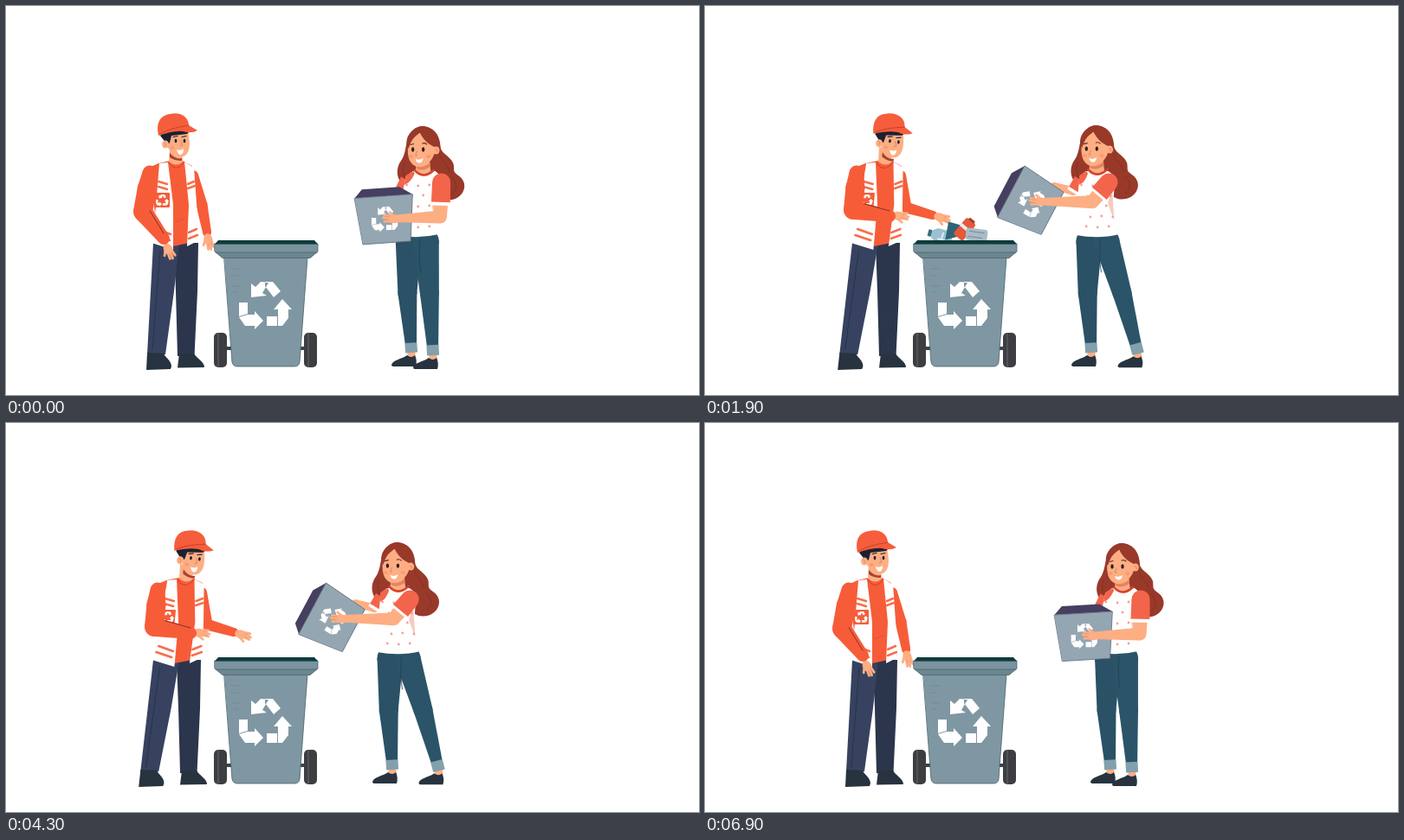
Write an HTML page with a canvas that moves like this. It is 800 px wide and 450 px high and loops after 7 s.

```html
<!DOCTYPE html>
<html lang="en">
<head>
<meta charset="utf-8">
<title>Recycling</title>
<style>
html, body { margin: 0; width: 100%; height: 100%; overflow: hidden; background: #fff; }
canvas { display: block; width: 800px; height: 450px; }
</style>
</head>
<body>
<canvas id="stage" width="800" height="450"></canvas>
<script>
const ctx = document.getElementById('stage').getContext('2d');
const LOOP = 7000, STEP = 100;
const SKIN = '#fdae83', RED = '#f75c39', SLEEVE = '#f3654b', HAIR = '#98392a', JEANS = '#2b5468', SHOE = '#27333f';

// ---- maths ----
const mix = (a, b, u) => a + (b - a) * u;
const mixPt = (a, b, u) => [mix(a[0], b[0], u), mix(a[1], b[1], u)];
const clamp = v => Math.max(0, Math.min(1, v));
const ramp = (t, from, to) => {
  const u = clamp((t - from) / (to - from));
  return u * u * (3 - 2 * u);
};

// ---- drawing helpers ----
function path(color, d) { ctx.fillStyle = color; ctx.fill(new Path2D(d)); }

function line(color, width, d) {
  ctx.strokeStyle = color;
  ctx.lineWidth = width;
  ctx.lineCap = ctx.lineJoin = 'round';
  ctx.stroke(new Path2D(d));
}

function oval(color, x, y, rx, ry = rx) {
  ctx.fillStyle = color;
  ctx.beginPath();
  ctx.ellipse(x, y, rx, ry, 0, 0, 7);
  ctx.fill();
}

function bar(color, x, y, w, h, r) {
  ctx.fillStyle = color;
  ctx.beginPath();
  ctx.roundRect(x, y, w, h, r);
  ctx.fill();
}

function at(x, y, turn, draw, scale = 1) {
  ctx.save();
  ctx.translate(x, y);
  ctx.rotate(turn);
  ctx.scale(scale, scale);
  draw();
  ctx.restore();
}

// Slants a drawing sideways, keeping the level y in place
function slant(k, y, draw) {
  ctx.save();
  ctx.transform(1, 0, k, 1, -k * y, 0);
  draw();
  ctx.restore();
}

// Tapered limb through joints, with a width at each
function limb(color, pts, widths, round = true) {
  pts.forEach((p, i) => {
    if (round) oval(color, p[0], p[1], widths[i] / 2);
    if (!i) return;
    const o = pts[i - 1], a = Math.atan2(p[1] - o[1], p[0] - o[0]);
    const nx = -Math.sin(a) / 2, ny = Math.cos(a) / 2, w = widths[i - 1], v = widths[i];
    path(color, `M${o[0] + nx * w} ${o[1] + ny * w}L${p[0] + nx * v} ${p[1] + ny * v}`
      + `L${p[0] - nx * v} ${p[1] - ny * v}L${o[0] - nx * w} ${o[1] - ny * w}Z`);
  });
}

function hand(x, y, turn) {
  at(x, y, turn, () => {
    oval(SKIN, -2, 0, 7, 5);
    line(SKIN, 2.8, 'M0 -3L8 -4M0 -1L10 0M0 2L9 3M-3 3L3 7');
    line('#e08a61', .6, 'M3 -2L8 -2M3 1.5L8 1.7');
  });
}

function arrows(x, y, turn, scale) {
  at(x, y, turn, () => {
    path('#fff', 'M-16 -26L-16 -10L2 -12L-3 -15L4 -27L-5 -28L-11 -22ZM0 -28L9 -28L18 -17L10 -10L0 -23Z'
      + 'M10 4L20 -8L31 4L27 4L27 14L20 23L15 23L15 4ZM2 12L14 12L14 23L2 23Z'
      + 'M-30 -4L-20 -4L-20 9L-30 12ZM-30 13L-20 10L-12 10L-12 6L-2 17L-12 27L-12 23L-23 23Z');
  }, scale);
}

// ---- bin ----
function bin() {
  line('#3f4145', 4, 'M250 396H350');
  for (const x of [240, 344]) {
    bar('#3c3e42', x, 378, 15, 40, 5);
    bar('#515358', x + 4, 378, 2, 40, 1);
  }
  const body = 'M252 291H348L339 412Q338 417 333 417H267Q262 417 261 412Z';
  path('#7f97a2', body);
  line('#47606b', .8, body);
  line('#728b96', 1, 'M260 304H271M260 312H268M261 324H271M262 331H267');
  path('#6a848f', 'M246 284H354L350 292H251Z');
  const rim = 'M241 275H360V284L351 291.5H250L241 284Z';
  path('#7a939e', rim);
  path('#6c8691', 'M242 285H359L351 291.5H250Z');
  line('#4c6671', .8, rim + 'M242 285H359');
  path('#0d3c3b', 'M245 271H356L360 275.5H241Z');
  arrows(299, 347, 0, 1);
}

// ---- man: q goes from upright to reaching out ----
function man(q) {
  const bulge = q * (1 - q);

  at(3 * q, 0, 0, () => {
    path('#2b364c', 'M194 274H222L221 330L217.5 405H198L196 330Z');
    path(SHOE, 'M200 402L217 402C220 408 229 411 229 418L198 418.5Z');
  });
  slant(-.06 * q, 274, () => {
    path('#36425f', 'M170 274H200L194 330L184 403H163L167 330Z');
    line('#25304a', .8, 'M178 283L169 398');
    path(SHOE, 'M163 401L182 402C184 407 191 410 191 417L190 420L162 421Z');
  });

  // far arm
  const elbow = [226 + 6 * q, 230 + 3 * q];
  const far = [234 + 39 * q + 20 * bulge, 272 - 27 * q + 18 * bulge];
  limb(RED, [[216 + 10 * q, 196], elbow, mixPt(elbow, far, .76)], [12, 13, 10]);
  hand(far[0], far[1], mix(1.3, .3, q));

  // shirt and vest
  slant(-.09 * q, 277, () => {
    ctx.translate(167, 0);
    ctx.scale(1 + .07 * q, 1);
    ctx.translate(-167, 0);
    path(RED, 'M165 187L176 182L189 179H204L215 185L221 272L193 278L172 240Z');
    path('#fff', 'M177 182L187 181L193 230V282L168 274L173 232Z');
    path('#fff', 'M206 180L217 187L223 271L209 278L211 230Z');
    line('#cf4226', 1, 'M188 181Q196 194 206 181');
    line('#d94b2b', .7, 'M196 250L206 246');
    line('#f6704d', 2.5, 'M176 203L186 206M176 209L186 212M210 206L217 203M210 211L218 208'
      + 'M174 258L190 264M172 265L189 271M211 262L220 258M211 269L221 265');
    bar(RED, 172, 216, 17, 17, 1);
    arrows(180.5, 225, 0, .25);
  });

  // near arm
  const shoulder = [166 + 9 * q, 193], bend = [158 + 13 * q, 238 - 2 * q];
  const wrist = [182 + 31 * q, 269 - 26 * q], fold = mixPt(bend, wrist, .25);
  hand(188 + 37 * q, 283 - 40 * q, mix(1.1, .1, q));
  limb(RED, [shoulder, mixPt(shoulder, bend, .4), bend, wrist], [17, 22, 22, 14]);
  line('#5e2a26', .8, `M${fold[0] + 2} ${fold[1] - 9}L${wrist[0]} ${wrist[1] - 6}`);

  // head
  at(12 * q, 0, 0, () => path(SKIN, 'M189 163L203 167L204 180Q197 187 188 180Z'));
  at(195 + 17 * q, 160, .12 * q, () => {
    ctx.translate(-195, -160);
    path('#a5442f', 'M189 170Q196 178 203 176L203 179Q194 179 189 175Z');
    path(SKIN, 'M187 148L210 144C212 155 213 163 210 169C206 177 197 176 192 171L187 164Z');
    path('#1c2130', 'M178 150L184 142L209 140L213 144L209 148L191 150L189 158L186 161L182 155Z');
    oval(SKIN, 184, 160, 4, 4.5);
    line('#d97d57', .8, 'M183 158Q186 160 184 162M202 156L204 161L201 162');
    for (const x of [196, 206]) {
      oval('#1c2130', x, 156, 1.4, 2.2);
      line('#1c2130', 1.2, `M${x - 3} 151.5L${x + 2} 150.5`);
    }
    oval('#f99a76', 192, 164, 2.5, 2);
    path('#fff', 'M197 166Q201 168 205 165Q205 172 201 172Q198 171 197 166Z');
    path('#f65d3c', 'M176 150C173 136 177 127 189 125C202 122 211 129 211 138L221 144Q216 147 208 146C200 143 188 146 176 150Z');
    line('#c23f24', .9, 'M178 148C190 141 202 140 211 138');
  });
}

// ---- box: turns as a rigid body while it moves ----
function boxPose(p) {
  const x = 438.5 - 68 * p, y = 247 - 24 * p ** 1.8, turn = -.06 - 1.14 * p;
  const cos = Math.cos(turn), sin = Math.sin(turn);
  return { x, y, turn, point: (u, v) => [x + u * cos - v * sin, y + u * sin + v * cos] };
}

const junk = [
  () => {
    path('#9cc0d0', 'M-3 -12H3L8 -5V12Q0 15 -8 12V-5Z');
    bar('#3c6c7e', -4, -15, 8, 4, 1);
    line('#dcebf0', 2, 'M-4 -2V8M4 2H-6');
  },
  () => path('#2f6476', 'M-12 9L-2 -10L9 -3L11 10Z'),
  () => {
    bar('#e4593c', -7, -12, 14, 25, 3);
    bar('#e9eef0', -7, -3, 14, 4, 0);
    bar('#a83c2a', -4, -14, 8, 3, 1);
  },
  () => {
    bar('#a9bcc6', -7, -12, 14, 25, 3);
    line('#748d9a', 1, 'M-3 -8V9M3 -6V10');
  }
];

// Rises out of the box, drops into the bin and sinks
function rubbish(t, box) {
  if (t > 2400) return;
  const rise = clamp(t / 1000) ** 2, sink = 34 * clamp((t - 1950) / 450);
  junk.forEach((draw, i) => {
    const fall = clamp((t - 1100 - 55 * i) / 600);
    const [x, y] = box.point(9 * i - 13, mix(0, 4 * i - 40, rise));
    at(mix(x, 272 + 14 * i, fall), mix(y, 266 - 9 * Math.sin(i), fall * fall) + sink,
      mix(box.turn, i - 1.3, fall), draw);
  });
}

// ---- woman: p goes from upright to leaning, step moves her near foot ----
function leg(hip, ankle, bend, turn, color) {
  const knee = [(hip + ankle[0]) / 2 - bend, 332];
  limb(SKIN, [ankle, [ankle[0] + turn * -3, ankle[1] + 7]], [9, 9]);
  at(ankle[0], ankle[1], turn, () =>
    path(SHOE, 'M-23 16C-21 10 -12 10 -5 5Q0 9 4 5Q7 11 5 18L-20 18Q-23 18 -23 16Z'));
  limb(color, [[hip, 272], knee, mixPt(knee, ankle, .9)], [30, 22, 13]);
  limb('#83a0ad', [mixPt(knee, ankle, .86), mixPt(knee, ankle, 1.03)], [14, 14], false);
}

function face() {
  path(SKIN, 'M474 178L489 178L491 193Q483 201 473 193Z');
  path('#e58360', 'M474 185Q482 188 490 181L490 186Q481 192 474 188Z');
  path(SKIN, 'M465 157C463 170 464 183 475 186C486 187 494 178 496 166L496 156L480 145Z');
  path(HAIR, 'M481 145C473 148 468 155 465 165C459 156 466 141 481 139Z');
  path(HAIR, 'M478 146C482 155 488 160 495 163L502 166C502 148 493 139 480 139Z');
  oval(SKIN, 497, 167, 3.8, 4.5);
  line('#d97d57', .8, 'M496 166Q499 165 498 169M475 168L473 173L475 173');
  for (const x of [470, 482]) oval('#2b2020', x, 166, 1.7, 2.7);
  for (const x of [468, 488]) oval('#f99a76', x, 174, 2.6, 1.9);
  line('#6f2a20', 1.1, 'M467 160.5L471 159.5M481 159Q484 158 486 160');
  path('#fff', 'M473 177Q478 179 482 176Q481 182 477 181.5Q474 181 473 177Z');
}

function woman(p, step, t) {
  const head = -33 * p, hips = -24 * p, box = boxPose(p);

  at(head, -p, 0, () => {
    path(HAIR, 'M463 158C466 145 473 139 481 139C491 139 498 148 501 160C502 172 514 173 517 183C518 190 516 191 521 195C528 199 531 206 529 212C526 222 516 226 506 224L466 206C461 211 456 209 456 204C451 197 451 188 455 181C461 173 461 166 463 158Z');
    line('#82301f', .8, 'M501 172C504 182 512 184 512 192M515 198C521 204 522 211 516 217M460 182C457 190 459 196 462 200');
  });

  // far arm
  const back = [463 + head, 201], cuff = [455 - 33 * p, 216 - 2 * p];
  limb(SKIN, [cuff, box.point(29, 14)], [10, 8]);
  limb(SLEEVE, [back, cuff], [15, 14], false);
  limb('#fff', [mixPt(back, cuff, .88), mixPt(back, cuff, 1.1)], [15, 15], false);

  // legs
  const lift = Math.sin(Math.PI * step);
  leg(465 + hips, [468 - 22 * step, 399 - 8 * lift], 3 + 20 * lift, -.4 * lift, '#2a5165');
  leg(485 + hips, [493 + 8 * p * p, 402 - 2 * p], 0, 0, JEANS);
  line('#1f4052', .8, `M${478 + hips} 270Q${476 + hips} 290 ${479 + hips} 308`);

  // top
  slant(.13 * p, 266, () => {
    ctx.translate(hips, 0);
    path('#fff', 'M470 191H496L503 197L497 230L500 264Q476 270 450 265L454 236L462 197Z');
    path('#f9cabf', 'M498 212L491 228L496 248L497 230Z');
    path(SLEEVE, 'M471 191L462 196L460 207Q467 205 472 194Z');
    for (let i = 0; i < 15; i++) {
      const row = Math.floor(i / 3);
      oval('#f2a196', 463 + i % 3 * 13 + row % 2 * 6, 207 + row * 12 + i % 2, 1.4);
    }
  });
  at(head, -p, 0, () => {
    face();
    line('#d5432f', 2.6, 'M472 190Q482 201 494 190');
  });

  // box, with the rubbish between its back and front
  at(box.x, box.y, box.turn, () => path('#463f60', 'M-33.5 -27L-24.5 -36.5H19L33.5 -27Z'));
  rubbish(t, box);
  at(box.x, box.y, box.turn, () => {
    const front = 'M-33.5 -27H33.5L27.5 27H-27.5Z';
    path('#94a6b2', front);
    line('#5e6f7c', .8, front);
    arrows(0, 0, .06, .53);
  });

  // near arm
  const top = [503 - 41 * p, 204], elbow = [502 - 61 * p, 244 - 21 * p ** 1.8];
  const grip = [box.x + 7.5, box.y - 1];
  limb(SKIN, [mixPt(top, elbow, .5), elbow, grip], [17, 15, 8]);
  hand(grip[0], grip[1], Math.PI + .1);
  limb(SLEEVE, [top, mixPt(top, elbow, .6)], [21, 22], false);
  oval(SLEEVE, top[0], top[1], 10.5);
  limb('#fff', [mixPt(top, elbow, .57), mixPt(top, elbow, .67)], [23, 23], false);
}

// ---- timeline ----
function frame() {
  const t = Math.floor(performance.now() % LOOP / STEP) * STEP;
  const reach = ramp(t, 0, 1400) - ramp(t, 4300, 6950);
  const lean = ramp(t, -150, 2400) - ramp(t, 3650, 6900);
  const step = ramp(t, 700, 1400) - ramp(t, 4300, 5000);
  ctx.fillStyle = '#fff';
  ctx.fillRect(0, 0, 800, 450);
  man(reach);
  woman(lean, step, t);
  bin();
  requestAnimationFrame(frame);
}
frame();
</script>
</body>
</html>
```
